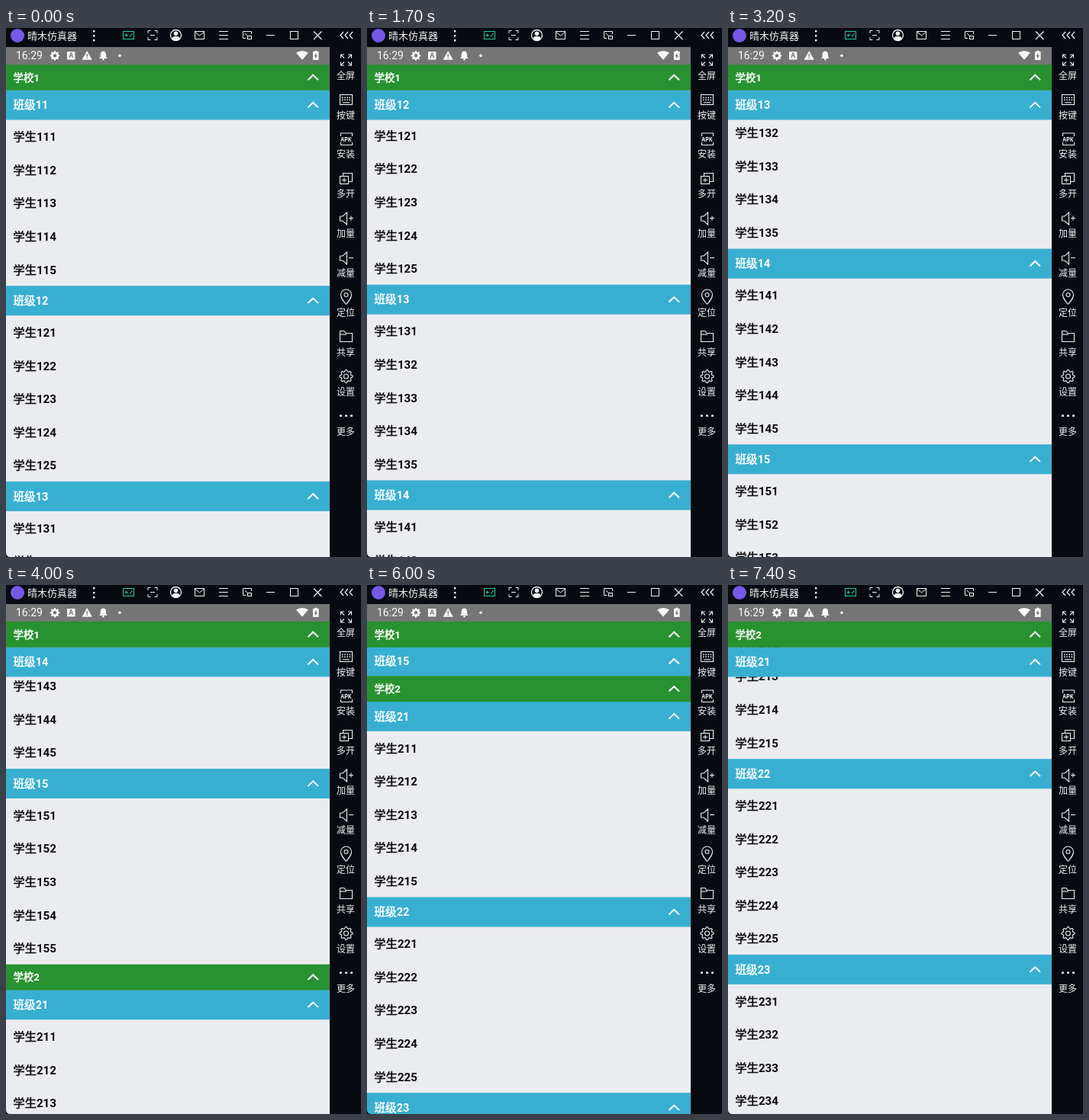
Write an HTML page with a canvas that moves like this. It is 465 px wide and 694 px high and loops after 8000 ms.

```html
<!DOCTYPE html>
<html lang="zh">
<head>
<meta charset="utf-8">
<style>
html, body { margin: 0; width: 100%; height: 100%; overflow: hidden; background: #070a11; }
canvas { display: block; width: 465px; height: 694px; }
</style>
</head>
<body>
<canvas id="stage" width="465" height="694"></canvas>
<script>
const ctx = document.getElementById('stage').getContext('2d');
const CJK = '"Noto Sans CJK SC", "Noto Sans CJK", sans-serif';
const LOOP = 8000, STEP = 100;
const W = 424, H = 694, TOP = 48;
const SCHOOL_H = 33.5, CLASS_H = 38.7, ROW_H = 43.6;
const GROUP_H = CLASS_H + 5 * ROW_H;
const BLOCK_H = SCHOOL_H + 5 * GROUP_H;
const GREEN = '#289130', BLUE = '#38afd1', PAPER = '#ebecf0', DARK = '#070a11', GREY = '#757575';

// Swipes: [time, scroll offset]
const KNOTS = [
  [0, 0], [700, 0], [1000, 85], [1200, 168], [1500, 238], [1700, 258.2], [2000, 265],
  [2200, 265], [2300, 330], [2500, 445.7], [2600, 478], [2800, 525], [3200, 562],
  [3400, 562], [3500, 590], [3700, 725], [3800, 787], [4000, 867.3], [4200, 895],
  [4400, 895], [4700, 990], [5100, 1121], [5300, 1138],
  [5500, 1138], [5800, 1200], [6000, 1245.7], [6400, 1287],
  [6700, 1337], [7000, 1395], [7400, 1427], [8000, 1427]
];

const slope = i => KNOTS[i + 1] && KNOTS[i]
  ? (KNOTS[i + 1][1] - KNOTS[i][1]) / (KNOTS[i + 1][0] - KNOTS[i][0]) : 0;

function tangent(i) {
  const a = slope(i - 1), b = slope(i);
  return a * b > 0 ? 2 * a * b / (a + b) : 0;
}

// Monotone cubic interpolation
function scrollAt(t) {
  let i = 0;
  while (i < KNOTS.length - 2 && t >= KNOTS[i + 1][0]) i++;
  const [t0, a] = KNOTS[i], [t1, b] = KNOTS[i + 1];
  const d = t1 - t0, u = (t - t0) / d, v = 1 - u;
  return a * (1 + 2 * u) * v * v + b * u * u * (3 - 2 * u)
    + d * (tangent(i) * u * v * v - tangent(i + 1) * u * u * v);
}

function rect(x, y, w, h, color) {
  ctx.fillStyle = color;
  ctx.fillRect(x, y, w, h);
}

function line(...pts) {
  ctx.beginPath();
  for (let i = 0; i < pts.length; i += 2) ctx.lineTo(pts[i], pts[i + 1]);
  ctx.stroke();
}

function poly(color, ...pts) {
  ctx.fillStyle = color;
  ctx.beginPath();
  for (let i = 0; i < pts.length; i += 2) ctx.lineTo(pts[i], pts[i + 1]);
  ctx.fill();
}

function disc(x, y, r, color) {
  ctx.fillStyle = color;
  ctx.beginPath();
  ctx.arc(x, y, r, 0, 7);
  ctx.fill();
}

function ring(x, y, r) {
  ctx.beginPath();
  ctx.arc(x, y, r, 0, 7);
  ctx.stroke();
}

function pen(color, width) {
  ctx.strokeStyle = color;
  ctx.lineWidth = width;
}

function text(s, x, y, font, color, align = 'left') {
  ctx.font = font;
  ctx.fillStyle = color;
  ctx.textAlign = align;
  ctx.fillText(s, x, y);
}

// Emboldened word followed by a number
function label(word, num, mid, size, color) {
  const y = mid + size * 0.37;
  text(word, 9.5, y, `${size}px ${CJK}`, color);
  pen(color, 0.5);
  ctx.strokeText(word, 9.5, y);
  text(num, 9.5 + ctx.measureText(word).width, y, `700 ${size}px Roboto, sans-serif`, color);
}

function header(word, num, y, h, size, color) {
  const mid = TOP + y + h / 2;
  rect(0, TOP + y, W, h + 0.3, color);
  label(word, num, mid, size, '#fff');
  pen('#fff', 2);
  line(395.5, mid + 3.5, 402.2, mid - 3, 409, mid + 3.5);
}

function list(scroll) {
  ctx.save();
  ctx.beginPath();
  ctx.rect(0, TOP, W, H - TOP);
  ctx.clip();
  rect(0, TOP, W, H - TOP, PAPER);
  const classes = [], schools = [];
  for (let s = 1; s <= 2; s++) {
    const top = (s - 1) * BLOCK_H - scroll;
    schools.push([s, Math.min(Math.max(top, 0), top + BLOCK_H - SCHOOL_H)]);
    for (let c = 1; c <= 5; c++) {
      const y = top + SCHOOL_H + (c - 1) * GROUP_H;
      classes.push([`${s}${c}`, Math.min(Math.max(y, SCHOOL_H), y + GROUP_H - CLASS_H)]);
      for (let r = 1; r <= 5; r++) {
        const mid = TOP + y + CLASS_H + (r - 0.5) * ROW_H + 0.6;
        if (mid > TOP && mid < H + 20) label('学生', `${s}${c}${r}`, mid, 15.2, '#0c0c0e');
      }
    }
  }
  const seen = ([, y]) => y > -60 && y < H;
  for (const [n, y] of classes.filter(seen)) header('班级', n, y, CLASS_H, 14.6, BLUE);
  for (const [n, y] of schools.filter(seen)) header('学校', n, y, SCHOOL_H, 13.4, GREEN);
  ctx.restore();
  ctx.fillStyle = DARK;
  ctx.beginPath();
  ctx.moveTo(0, H - 6);
  ctx.quadraticCurveTo(0, H, 6, H);
  ctx.lineTo(0, H);
  ctx.fill();
}

function gearPath(x, y, r, teeth) {
  ctx.beginPath();
  for (let i = 0; i < teeth * 4; i++) {
    const a = (i - 0.5) * Math.PI / teeth / 2;
    const q = i % 4 < 2 ? r : r * 0.76;
    ctx.lineTo(x + q * Math.cos(a), y + q * Math.sin(a));
  }
  ctx.closePath();
}

function statusBar() {
  const c = '#fafafa';
  rect(0, 25, W, 23, GREY);
  text('16:29', 13, 41.3, '14px Roboto, sans-serif', c);
  gearPath(64, 36.3, 6.4, 8);
  ctx.fillStyle = c;
  ctx.fill();
  disc(64, 36.3, 2.2, GREY);
  rect(80, 31, 10.5, 10.5, c);
  text('A', 85.2, 39.4, '700 9px Roboto, sans-serif', GREY, 'center');
  poly(c, 106.2, 30, 112.8, 41.8, 99.6, 41.8);
  rect(105.5, 34, 1.4, 3.8, GREY);
  rect(105.5, 38.7, 1.4, 1.4, GREY);
  ctx.fillStyle = c;
  ctx.beginPath();
  ctx.moveTo(122, 40);
  ctx.lineTo(123.6, 38);
  ctx.bezierCurveTo(123.6, 33, 124, 31, 127.4, 30.6);
  ctx.bezierCurveTo(130.8, 31, 131.2, 33, 131.2, 38);
  ctx.lineTo(132.8, 40);
  ctx.fill();
  disc(127.4, 41.2, 1.3, c);
  disc(149, 36.3, 1.8, c);
  ctx.beginPath();
  ctx.moveTo(388, 41.8);
  ctx.lineTo(380, 32.6);
  ctx.quadraticCurveTo(388, 27.2, 396, 32.6);
  ctx.fill();
  rect(402, 31, 7.6, 11, c);
  rect(404.2, 29.8, 3.2, 1.5, c);
  poly(GREY, 406.6, 32.5, 403.5, 37.2, 405.3, 37.2, 405, 40.6, 408.1, 35.9, 406.3, 35.9);
}

// Four corner brackets around a centre
function corners(x, y, r, len) {
  for (const sx of [-1, 1]) for (const sy of [-1, 1]) {
    line(x + sx * (r - len), y + sy * r, x + sx * r, y + sy * r, x + sx * r, y + sy * (r - len));
  }
}

function titleBar() {
  const c = '#f2f2f2';
  disc(15, 10, 9, '#7659e6');
  text('晴木仿真器', 28, 14.8, `13px ${CJK}`, c);
  for (const y of [3, 9, 15]) rect(114, y, 2.4, 2.4, c);

  const mint = '#20cf9a';
  pen(mint, 1);
  ctx.strokeRect(153.5, 4.5, 14, 10);
  line(155.5, 9.5, 160, 9.5);
  line(157.7, 7.3, 157.7, 11.7);
  rect(162, 9.5, 1.7, 1.7, mint);
  rect(164, 7.5, 1.7, 1.7, mint);

  pen(c, 1);
  corners(192, 9.5, 6, 3.5);
  line(189, 9.5, 195, 9.5);

  pen(c, 1.3);
  ring(222.5, 9.5, 7);
  disc(222.5, 7.3, 2.8, c);
  ctx.beginPath();
  ctx.ellipse(222.5, 13.6, 4.8, 2.8, 0, 0, 7);
  ctx.fill();

  pen(c, 1);
  ctx.strokeRect(247.5, 4.5, 12, 10);
  line(248, 5.5, 253.5, 10, 259, 5.5);
  for (const y of [4.5, 9.5, 14.5]) line(279, y, 291, y);
  line(313, 4.5, 310.5, 4.5, 310.5, 13.5, 314, 13.5);
  line(313, 4.5, 321.5, 4.5, 321.5, 8);
  ctx.strokeRect(316.5, 10.5, 5, 4);
  line(313, 7, 316, 10);
  line(341, 9.5, 352, 9.5);
  ctx.strokeRect(372.5, 4.5, 10, 10);
  pen(c, 1.2);
  line(403, 4.5, 413.5, 15);
  line(413.5, 4.5, 403, 15);
  for (const x of [438, 444, 450]) line(x + 4, 5, x, 9.5, x + 4, 14);
}

function speaker(y, plus) {
  line(437.5, y - 3, 441, y - 3, 446.5, y - 8, 446.5, y + 8, 441, y + 3, 437.5, y + 3, 437.5, y - 3);
  line(449, y - 0.5, 455, y - 0.5);
  if (plus) line(452, y - 3.5, 452, y + 2.5);
}

const TOOLS = [
  ['全屏', y => {
    corners(445.5, y, 7, 4.5);
    for (const sx of [-1, 1]) for (const sy of [-1, 1]) {
      line(445.5 + sx * 2.5, y + sy * 2.5, 445.5 + sx * 7, y + sy * 7);
    }
  }],
  ['按键', y => {
    ctx.strokeRect(437.5, y - 6.5, 16, 13);
    for (const dy of [-3.5, -0.5]) for (let i = 0; i < 4; i++) rect(440 + i * 3.2, y + dy, 1.6, 1.6, '#eee');
    line(441, y + 3.8, 450, y + 3.8);
  }],
  ['安装', y => {
    line(438.5, y - 4, 438.5, y - 8, 453.5, y - 8, 453.5, y - 4);
    line(438.5, y + 4, 438.5, y + 7.5, 453.5, y + 7.5, 453.5, y + 4);
    text('APK', 445.5, y + 2.8, '700 8px "Noto Sans Mono", monospace', '#eee', 'center');
  }],
  ['多开', y => {
    ctx.strokeRect(437.5, y - 3.5, 11, 10);
    line(441.5, y - 4, 441.5, y - 7.5, 453.5, y - 7.5, 453.5, y + 3.5, 449, y + 3.5);
    line(440, y + 1.5, 446, y + 1.5);
    line(443, y - 1.5, 443, y + 4.5);
  }],
  ['加量', y => speaker(y, true)],
  ['减量', y => speaker(y, false)],
  ['定位', y => {
    ctx.beginPath();
    ctx.moveTo(445.5, y + 9.5);
    ctx.bezierCurveTo(441, y + 4, 438.5, y + 1, 438.5, y - 3);
    ctx.arc(445.5, y - 3, 7, Math.PI, 0);
    ctx.bezierCurveTo(452.5, y + 1, 450, y + 4, 445.5, y + 9.5);
    ctx.stroke();
    ring(445.5, y - 3, 2.5);
  }],
  ['共享', y => {
    line(437.5, y + 6.5, 437.5, y - 7.5, 443, y - 7.5, 445, y - 4.5, 453.5, y - 4.5, 453.5, y + 6.5, 437, y + 6.5);
    line(437.5, y - 3, 446, y - 3);
  }],
  ['设置', y => {
    gearPath(445.5, y, 8.5, 8);
    ctx.stroke();
    ring(445.5, y, 3);
  }],
  ['更多', y => {
    for (const x of [437, 444, 451]) rect(x, y - 1.5, 3, 2.4, '#eee');
  }]
];

function sideBar() {
  TOOLS.forEach(([name, icon], i) => {
    const y = 42 + i * 51.9;
    pen('#eee', 1.1);
    icon(Math.round(y));
    text(name, 445, Math.round(y + 24.6), `12px ${CJK}`, '#f0f0f0', 'center');
  });
}

function draw(t) {
  rect(0, 0, 465, H, DARK);
  titleBar();
  sideBar();
  statusBar();
  list(scrollAt(Math.floor(t / STEP) * STEP));
}

const start = performance.now();
function tick() {
  draw((performance.now() - start) % LOOP);
  requestAnimationFrame(tick);
}
tick();
</script>
</body>
</html>
```
